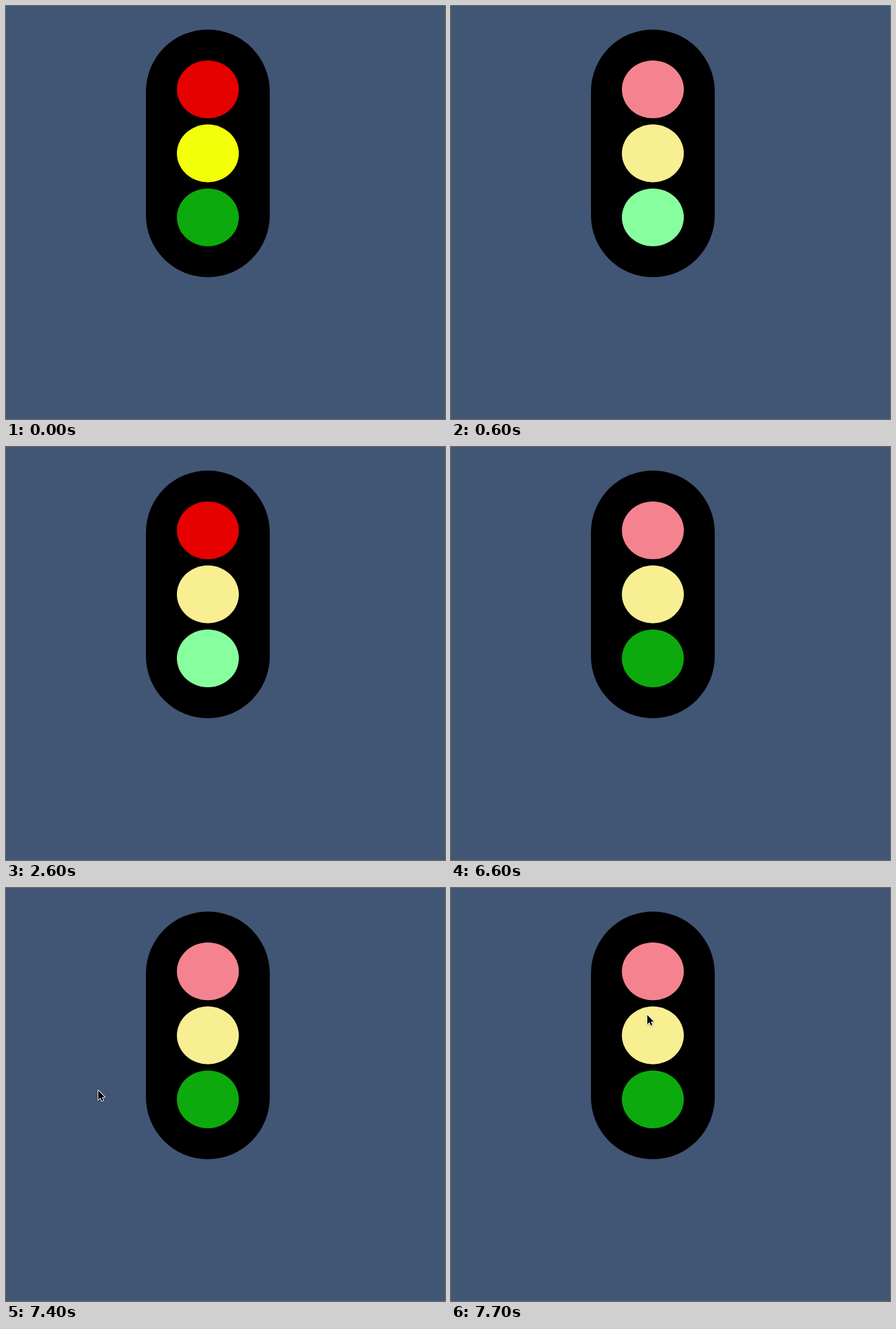
An HTML page with a canvas that plays this animation: 709x667 px, repeating every 8 s.

```html
<!DOCTYPE html>
<html lang="en">
<head>
<meta charset="utf-8">
<title>Traffic light</title>
<style>
  html, body { margin: 0; width: 100%; height: 100%; overflow: hidden; background: #415575; }
  canvas { display: block; }
</style>
</head>
<body>
<canvas id="stage" width="709" height="667"></canvas>
<script>
const ctx = document.getElementById('stage').getContext('2d');
const LOOP = 8000;

const lamps = [
  { on: '#e60000', off: '#f4838f' },
  { on: '#f4ff0a', off: '#f8ef92' },
  { on: '#0caa0c', off: '#88ff9f' }
];

// Which lamps are lit (red, yellow, green) from each moment on
const phases = [
  { at: 0, lit: [1, 1, 1] },
  { at: 600, lit: [0, 0, 0] },
  { at: 2600, lit: [1, 0, 0] },
  { at: 4600, lit: [0, 1, 0] },
  { at: 6600, lit: [0, 0, 1] }
];

// The pointer jumps between sampled positions
const pointer = [
  { at: 7200, x: 50, y: 402 },
  { at: 7400, x: 149, y: 327 },
  { at: 7600, x: 257, y: 248 },
  { at: 7700, x: 317, y: 205 }
];

const current = (steps, t) => steps.filter(s => s.at <= t).pop();

function drawHousing() {
  ctx.fillStyle = '#000';
  ctx.beginPath();
  ctx.arc(326, 138, 100, Math.PI, 0);
  ctx.arc(326, 338, 100, 0, Math.PI);
  ctx.fill();
}

function drawLamp(i, lit) {
  const height = 280 / 3;
  ctx.fillStyle = lit ? lamps[i].on : lamps[i].off;
  ctx.beginPath();
  ctx.ellipse(326, 88 + height / 2 + i * (height + 10), 50, height / 2, 0, 0, Math.PI * 2);
  ctx.fill();
}

function drawPointer({ x, y }) {
  const arrow = new Path2D('M0 0V15L3.5 11.7L5.8 17L8.2 16L5.9 10.8H10.6Z');
  ctx.save();
  ctx.translate(x, y);
  ctx.lineWidth = 2;
  ctx.lineJoin = 'round';
  ctx.strokeStyle = '#fff';
  ctx.shadowColor = 'rgba(0, 0, 0, 0.35)';
  ctx.shadowBlur = 2;
  ctx.shadowOffsetY = 1;
  ctx.stroke(arrow);
  ctx.shadowColor = 'transparent';
  ctx.fillStyle = '#000';
  ctx.fill(arrow);
  ctx.restore();
}

function draw(t) {
  ctx.fillStyle = '#415575';
  ctx.fillRect(0, 0, 709, 667);
  drawHousing();
  current(phases, t).lit.forEach((lit, i) => drawLamp(i, lit));
  const position = current(pointer, t);
  if (position) drawPointer(position);
}

const start = performance.now();
function tick() {
  draw((performance.now() - start) % LOOP);
  requestAnimationFrame(tick);
}
tick();
</script>
</body>
</html>
```
